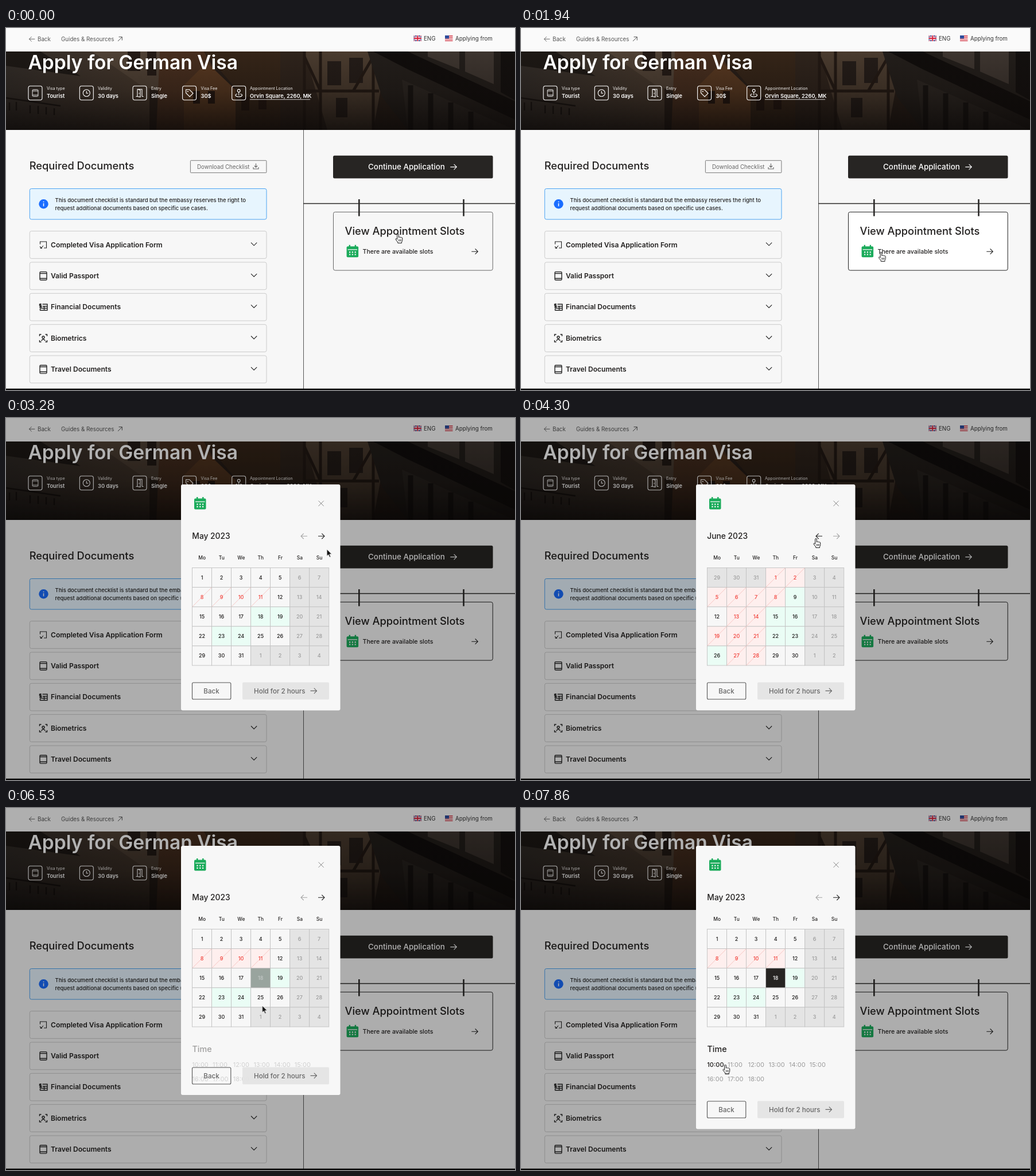
Animation, 887 px wide and 632 px high, one loop 8 s. Source, as an HTML page:

```html
<!DOCTYPE html>
<html lang="en">
<head>
<meta charset="utf-8">
<title>Visa appointment</title>
<style>
html, body { margin: 0; width: 100%; height: 100%; overflow: hidden; background: #f7f7f7; }
svg { display: block; width: 100%; height: 100%; }
text { font-family: Inter, "Open Sans", sans-serif; font-optical-sizing: none; fill: #232120; white-space: pre; }
.line { fill: none; stroke: #333; stroke-width: 1.1; }
.nav text { font-size: 9.75px; fill: #555; }
.facts text { font-size: 7.2px; fill: #f4f2f0; }
.facts .val { font-size: 9.3px; font-weight: 600; fill: #fff; }
.facts .line { stroke: #fff; stroke-width: 1.1; }
.rows text { font-size: 12.08px; font-weight: 600; }
.rows .line { stroke: #222; stroke-width: 1.4; }
.note { font-size: 9.42px; font-weight: 500; }
.h2 { font-size: 18.3px; font-weight: 500; }
.h3 { font-size: 13.8px; font-weight: 500; }
.mid { text-anchor: middle; }
.week { font-size: 8.5px; font-weight: 500; }
.day { font-size: 9px; font-weight: 500; }
.btn { font-size: 11.6px; font-weight: 500; fill: #666; }
.hours text { font-size: 11px; fill: #9a9a9a; }

.card, .dim, .modal, .shift, .panel, .foot, .may, .june, .busy, .mark, .pick, .time, .ten, .cursor, .hand, .arrow {
  animation-duration: 8s; animation-iteration-count: infinite; animation-timing-function: linear;
}
.dim, .modal { animation-name: open; animation-timing-function: step-end; }
.card { animation-name: card; }
.shift { animation-name: shift; animation-timing-function: step-end; }
.panel { animation-name: panel; }
.foot { animation-name: foot; }
.may { animation-name: may; animation-timing-function: step-end; }
.june { animation-name: june; animation-timing-function: step-end; }
.june .busy { animation: none; }
.busy { animation-name: busy; animation-timing-function: step-end; }
.mark { animation-name: mark; }
.pick { animation-name: pick; }
.time { animation-name: time; }
.ten { animation-name: ten; animation-timing-function: step-end; }
.cursor { animation-name: move; animation-timing-function: ease-in-out; }
.hand { animation-name: hand; animation-timing-function: step-end; }
.arrow { animation-name: arrow; animation-timing-function: step-end; }

@keyframes open { 0% { opacity: 0 } 25.9%, 100% { opacity: 1 } }
@keyframes card {
  0%, .93% { fill: #f7f7f7; stroke: #666 }
  5%, 25.8% { fill: #fff; stroke: #222 }
  25.9%, 100% { fill: #f7f7f7; stroke: #222 }
}
@keyframes shift { 0% { transform: translateY(0) } 79.6%, 100% { transform: translateY(-50px) } }
@keyframes panel { 0%, 80.56% { height: 394.5px } 82.41% { height: 435px } 84.26%, 100% { height: 494.5px } }
@keyframes foot {
  0%, 80.56% { transform: translateY(0) } 82.41% { transform: translateY(41px) } 84.26%, 100% { transform: translateY(100px) }
}
@keyframes may { 0% { opacity: 1 } 48.1% { opacity: 0 } 57.4%, 100% { opacity: 1 } }
@keyframes june { 0% { opacity: 0 } 48.1% { opacity: 1 } 57.4%, 100% { opacity: 0 } }
@keyframes busy { 0% { fill: #f7f7f7 } 48.1%, 100% { fill: #feefee } }
@keyframes mark {
  0%, 64.7% { opacity: 0 } 64.8%, 79.6% { opacity: 1 } 79.7%, 80.56% { opacity: 0 } 82.41% { opacity: .41 } 84.26%, 100% { opacity: 1 }
}
@keyframes pick {
  0%, 64.7% { fill: #232120 } 64.8%, 79.6% { fill: #fff } 79.7%, 80.56% { fill: #232120 } 82.41% { fill: #c3c8c6 } 84.26%, 100% { fill: #fff }
}
@keyframes time { 0%, 80.56% { opacity: 0 } 82.41% { opacity: .41 } 84.26%, 100% { opacity: 1 } }
@keyframes ten { 0% { fill: #9a9a9a; font-weight: 400 } 96.3%, 100% { fill: #1c1a19; font-weight: 500 } }
@keyframes move {
  0%, 1.5% { transform: translate(683px, 360px) }
  23.15%, 25.8% { transform: translate(627.5px, 392px) }
  25.9%, 30.56% { transform: translate(627px, 391px) }
  45.37%, 47.22% { transform: translate(549px, 205px) }
  54.63%, 56.48% { transform: translate(514px, 211px) }
  65.74%, 69.44% { transform: translate(446px, 357px) }
  73.15%, 79.5% { transform: translate(446px, 348.5px) }
  79.6%, 87.96% { transform: translate(446.5px, 345px) }
  97.22%, 100% { transform: translate(356px, 448.5px) }
}
@keyframes hand {
  0% { opacity: 1 } 25.9% { opacity: 0 } 42.6% { opacity: 1 } 57.4% { opacity: 0 }
  64.8% { opacity: 1 } 79.6% { opacity: 0 } 96.3%, 100% { opacity: 1 }
}
@keyframes arrow {
  0% { opacity: 0 } 25.9% { opacity: 1 } 42.6% { opacity: 0 } 57.4% { opacity: 1 }
  64.8% { opacity: 0 } 79.6% { opacity: 1 } 96.3%, 100% { opacity: 0 }
}
</style>
</head>
<body>
<svg viewBox="0 0 887 632" preserveAspectRatio="none">
<defs>
  <path id="to" d="M0 0H11M6.3-4.7 11 0 6.3 4.7" fill="none" stroke-width="1.1"/>
  <g id="cal">
    <rect y="2.5" width="20.5" height="19" rx="2" fill="#1bab5b"/>
    <path d="M5.2 0V5M15.3 0V5" stroke="#1bab5b" stroke-width="2.4"/>
    <path d="M2 8.2H18.5" stroke="#f7f7f7" stroke-width="1.3"/>
    <path d="M4.4 12.6h2.2m2.6 0h2.2m2.6 0h2.2M4.4 16.8h2.2m2.6 0h2.2m2.6 0h2.2" stroke="#f7f7f7" stroke-width="2.2"/>
  </g>
  <g id="pass" fill="none"><rect x="-6" y="-7.2" width="12" height="14.4" rx="1.6"/><path d="M-6-4.4H6M-6 4.4H6"/></g>
  <linearGradient id="shade" x2="0" y2="1">
    <stop offset="0" stop-color="#0e0a08" stop-opacity=".3"/>
    <stop offset=".5" stop-color="#0e0a08" stop-opacity=".5"/>
    <stop offset="1" stop-color="#0b0807" stop-opacity=".85"/>
  </linearGradient>
  <linearGradient id="wall"><stop stop-color="#3f3934"/><stop offset="1" stop-color="#5c4a3b"/></linearGradient>
  <clipPath id="hero"><rect y="41" width="887" height="137"/></clipPath>
</defs>

<rect width="887" height="632" fill="#f7f7f7"/>
<rect width="887" height="41" fill="#fafafa"/>

<g clip-path="url(#hero)">
  <rect y="41" width="887" height="137" fill="#33261e"/>
  <path d="M0 41H150L250 90V178H0z" fill="url(#wall)"/>
  <path d="M0 41H60L130 84 0 66z" fill="#231e1a"/>
  <path d="M150 41H270V112L235 100z" fill="#6a5848"/>
  <path d="M212 41h22v34h-22zM246 41h16v42h-16z" fill="#2c211b"/>
  <path d="M268 41H345L385 110V178H262z" fill="#5e3d28"/>
  <path d="M310 178V100L350 60 400 108V178z" fill="#754b2b"/>
  <path d="M345 41H490V178H400V105z" fill="#45301f"/>
  <path d="M326 110h12v22h-12zM352 110h12v22h-12zM410 120h14v24h-14zM440 118h14v24h-14z" fill="#2b1a12"/>
  <path d="M478 41H665L640 178H478z" fill="#63503f"/>
  <path d="M478 41H520L560 178H478z" fill="#3c2e24"/>
  <path d="M560 58h24v42h-24zM598 52h24v44h-24zM575 122h20v34h-20z" fill="#2d241f"/>
  <path d="M520 41V178M548 41V178M640 41V178M520 110H650M520 50 548 110M640 50 605 110" fill="none" stroke="#2b1f18" stroke-width="5"/>
  <path d="M630 41H887V178H700L655 120z" fill="#2b2622"/>
  <path d="M640 41H700L887 128V160L700 72z" fill="#110e0d"/>
  <path d="M735 41H790V72L735 50zM800 41H850V98L800 76z" fill="#514740"/>
  <path d="M690 90 887 178H700z" fill="#37312c"/>
  <path d="M705 100V178M740 114V178M775 130V178M810 146V178" stroke="#191614" stroke-width="9"/>
  <path d="M862 41H887V126L862 112z" fill="#151211"/>
  <path d="M0 122 95 136M6 130v14m12-15v15m24-9v14m14-13v14m14-12v13m14-11v12" stroke="#1d1815" stroke-width="2.4" fill="none"/>
  <rect y="41" width="887" height="137" fill="url(#shade)"/>
</g>

<g class="nav">
  <use href="#to" transform="translate(50.3 19.3) scale(-.9 .9)" stroke="#666"/>
  <text x="55" y="22.7">Back</text>
  <text x="96" y="22.7">Guides &amp; Resources</text>
  <path class="line" d="M195 23 202 16M196.5 15.6H202.3V21.5" style="stroke:#555;stroke-width:1"/>
  <g transform="translate(710.5 13)">
    <rect width="13.5" height="10" fill="#1f3c8c"/>
    <path d="M0 0 13.5 10M13.5 0 0 10" stroke="#fff" stroke-width="2"/>
    <path d="M0 0 13.5 10M13.5 0 0 10" stroke="#d8203a" stroke-width=".8"/>
    <path d="M6.75 0V10M0 5H13.5" stroke="#fff" stroke-width="3.6"/>
    <path d="M6.75 0V10M0 5H13.5" stroke="#d8203a" stroke-width="2"/>
  </g>
  <text x="728" y="22" style="fill:#333">ENG</text>
  <g transform="translate(765 13)">
    <rect width="13.5" height="10" fill="#fff"/>
    <path d="M0 .7H13.5M0 3.5H13.5M0 6.4H13.5M0 9.3H13.5" stroke="#d33a48" stroke-width="1.4"/>
    <rect width="7" height="5.4" fill="#2c4a9a"/>
  </g>
  <text x="783" y="22" style="fill:#333">Applying from</text>
</g>

<text x="38.5" y="72" style="font-size:33.5px;font-weight:600;fill:#fff">Apply for German Visa</text>
<g class="facts" id="facts"></g>

<text class="h2" x="40.7" y="246.7">Required Documents</text>
<rect class="line" x="321.4" y="231.3" width="132.5" height="21.4" rx="1" style="stroke:#777;stroke-width:1"/>
<text x="333" y="245.7" style="font-size:9.75px;fill:#666">Download Checklist</text>
<path class="line" d="M435.5 236.5V243M432.8 240.5 435.5 243.2 438.2 240.5M431 243V246H440V243" style="stroke:#666"/>

<rect x="41.3" y="280.5" width="412.7" height="53.6" rx="3" fill="#e7f5fe" stroke="#4ba3f2"/>
<circle cx="65.5" cy="307.3" r="8.2" fill="#1a6dff"/>
<path d="M65.5 306V311.3M65.5 302.8V304.3" stroke="#fff" stroke-width="1.5"/>
<text class="note" x="85.5" y="303.7">This document checklist is standard but the embassy reserves the right to</text>
<text class="note" x="85.5" y="318.4">request additional documents based on specific use cases.</text>
<g class="rows" id="rows"></g>

<path d="M518.5 178V630" stroke="#555"/>
<path d="M518 306.5H887" stroke="#2a2827" stroke-width="1.7"/>
<rect x="570" y="222.7" width="278.5" height="39.8" rx="2.5" fill="#272523"/>
<text x="631" y="247.3" style="font-size:13.4px;font-weight:500;fill:#fff">Continue Application</text>
<use href="#to" x="774.3" y="242.6" stroke="#fff"/>

<rect class="card" x="570.5" y="321.3" width="277.7" height="101.8" rx="3"/>
<path d="M615.3 299V328.5M797.5 299V328.5" stroke="#2a2827" stroke-width="2.6"/>
<text class="h2" x="590.5" y="360.7">View Appointment Slots</text>
<use href="#cal" x="593.6" y="378.7"/>
<text x="621.5" y="394" style="font-size:10.6px;font-weight:500">There are available slots</text>
<use href="#to" x="811.3" y="390.2" stroke="#222"/>
<rect y="629.6" width="887" height="3" fill="#000"/>

<rect class="dim" width="887" height="632" fill="rgba(0,0,0,.3)"/>
<g class="modal"><g class="shift">
  <rect class="panel" x="305" y="116" width="277.5" height="394.5" rx="3" fill="#f7f7f7"/>
  <use href="#cal" x="328" y="138"/>
  <path d="M544.5 144.6 553.7 153.8M553.7 144.6 544.5 153.8" stroke="#888"/>
  <g id="week"></g>
  <g class="may" id="may"></g>
  <g class="june" id="june"></g>
  <g class="time hours" id="hours"><text x="324.5" y="476.3" style="font-size:14.3px;font-weight:500;fill:#232120">Time</text></g>
  <g class="foot">
    <rect x="412" y="461.5" width="151" height="30" rx="2" fill="#e4e4e4" fill-opacity=".94"/>
    <rect class="line" x="324.5" y="462" width="67.3" height="29" rx="2" style="stroke:#555"/>
    <text class="btn mid" x="358" y="480.7">Back</text>
    <text class="btn" x="432" y="480.7">Hold for 2 hours</text>
    <use href="#to" x="530.5" y="476.4" stroke="#666"/>
  </g>
</g></g>

<g class="cursor">
  <g class="hand" fill="#fff" stroke="#111" stroke-linejoin="round">
    <path d="M-1.3 8.5V.8a1.3 1.3 0 0 1 2.6 0V5.5a1.2 1 0 0 1 2.3.2 1.2 1 0 0 1 2.2.4 1.1 1 0 0 1 1.9.8V10.5q0 2-1.2 3.2V15.4H-.2V14L-3.9 9.4q-.6-1.2.4-1.6 .8-.3 2.2 1.4z"/>
    <path d="M1.4 9V12.5M3.4 9V12.5M5.3 9V12.5" stroke-width=".8"/>
  </g>
  <path class="arrow" d="M0 0V12.2L2.8 9.6 4.8 14.2 6.8 13.3 4.8 8.8H8.6z" fill="#111" stroke="#fff" stroke-width=".8"/>
</g>
</svg>

<script>
const LOOP = 8000, STEPS = 54;
const put = (id, html) => document.getElementById(id).insertAdjacentHTML('beforeend', html);

const door = '<path d="M-4 6V-6.5H4V6M-6.5 6H-4M4 6H6.5M-4-6.5 1-5V7L-4 6M-1 0V1.5"/>';
const facts = [
  [39, 71, 'Visa type', 'Tourist', '<use href="#pass" transform="scale(.82)"/>'],
  [128.3, 160, 'Validity', '30 days', '<circle r="6"/><path d="M0-3.5V.5H3"/>'],
  [221, 253, 'Entry', 'Single', door],
  [307.6, 339.5, 'Visa Fee', '30$', '<path d="M-6-6H0L6.5 .5 .5 6.5-6 0z"/><circle cx="-2.8" cy="-2.8" r=".5"/>'],
  [393.7, 425, 'Appointment Location', 'Orvin Square, 2260, MK',
    '<circle cy="-4" r="2.4"/><path d="M0-1.6V4M-2.5 1.5C-9 3-5 6.5 0 6.5S9 3 2.5 1.5"/>']
];
put('facts', facts.map(([bx, x, label, val, icon]) => `
  <rect class="line" x="${bx}" y="101.3" width="24" height="24.4" rx="3.5"/>
  <g class="line" transform="translate(${bx + 12} 113.5)">${icon}</g>
  <text x="${x}" y="108.4">${label}</text><text class="val" x="${x}" y="122">${val}</text>`).join('')
  + '<path d="M425 124.8H530" stroke="#fff" stroke-width=".8"/>');

const book = '<use href="#pass"/>';
const rows = [
  ['Completed Visa Application Form', '<path stroke-width="1.1" d="M-5.5-1V-5.5H5.5V5.5H1M-6 3 -3.5 5.5 0 1.5M-5.5 6H-2"/>'],
  ['Valid Passport', book],
  ['Financial Documents', '<path d="M-1.5-5H7V5.5H-5.5V2M-1.5-1.5H7M-5.5 2H7M1.5-1.5V5.5M-3-5H-6.5V-2.6H-3.5V0H-7M-5-6.2V1"/>'],
  ['Biometrics', '<path d="M-6.5-3.5V-6.5H-3.5M3.5-6.5H6.5V-3.5M6.5 3.5V6.5H3.5M-3.5 6.5H-6.5V3.5M-3.5 4.5Q0-.5 3.5 4.5"/><circle cy="-1.5" r="2"/>'],
  ['Travel Documents', book]
];
put('rows', rows.map(([name, icon], i) => `<g transform="translate(0 ${i * 54.35})">
  <rect x="41.3" y="354.6" width="412.7" height="47.8" rx="3" fill="none" stroke="#cbcbcb"/>
  <g class="line" transform="translate(65 378.5)">${icon}</g>
  <text x="78" y="382.8">${name}</text>
  <path class="line" d="M427 374.7 432.1 379.8 437.2 374.7" style="stroke-width:1.1"/></g>`).join(''));

const W = 34.03, H = 34.1, X = 324.5, Y = 261.5;
put('week', ['Mo', 'Tu', 'We', 'Th', 'Fr', 'Sa', 'Su'].map((d, c) =>
  `<text class="week mid" x="${X + W * (c + .5) + .3}" y="247.3">${d}</text>`).join(''));

function month(id, title, lead, len, busy, free, back) {
  let boxes = '', marks = '';
  for (let i = 0; i < 35; i++) {
    const x = X + i % 7 * W, y = Y + Math.floor(i / 7) * H, d = i + 1 - lead;
    const out = d < 1 || d > len, off = out || i % 7 > 4;
    const full = !off && busy.includes(d), pick = id === 'may' && d === 18;
    const fill = off ? '#e4e4e4' : full ? '#feefee' : free.includes(d) ? '#eafdf5' : '#f7f7f7';
    const ink = off ? '#9b9b9b' : full ? '#f2413a' : '#1c1a19';
    const rect = (cls, color) =>
      `<rect class="${cls}" x="${x}" y="${y}" width="${W}" height="${H}" fill="${color}" stroke="#c2c2c2" stroke-width=".9"/>`;
    boxes += rect(full ? 'busy' : '', fill);
    if (full) marks += `<path d="M${x} ${y + H}L${x + W} ${y}" stroke="#f5bdb9" stroke-width=".8"/>`;
    if (pick) marks += rect('mark', '#262422');
    marks += `<text class="day mid${pick ? ' pick' : ''}" x="${x + W / 2}" y="${y + 20.2}"${pick ? '' : ` style="fill:${ink}"`}>${d < 1 ? 31 + d : out ? d - len : d}</text>`;
  }
  const tone = on => on ? '#222' : '#a3a3a3';
  put(id, `<text class="h3" x="324.3" y="211.4">${title}</text>
    <use href="#to" transform="translate(525 206.3) scale(-1 1)" stroke="${tone(back)}"/>
    <use href="#to" x="544" y="206.3" stroke="${tone(!back)}"/>` + boxes + marks);
}
month('may', 'May 2023', 0, 31, [8, 9, 10, 11], [18, 19, 23, 24], false);
month('june', 'June 2023', 3, 30, [1, 2, 5, 6, 7, 8, 13, 14, 19, 20, 21, 27, 28], [9, 15, 16, 22, 23, 26], true);

for (let i = 0; i < 9; i++)
  put('hours', `<text class="${i ? '' : 'ten'}" x="${324.3 + i % 6 * 35.7}" y="${i < 6 ? 502 : 526.8}">${10 + i}:00</text>`);

// The keyframes run on a clock that ticks 54 times per loop.
const anims = document.getAnimations();
anims.forEach(a => a.pause());
const start = performance.now();
function tick() {
  const t = (performance.now() - start) % LOOP;
  const time = (Math.floor(t / LOOP * STEPS) + .5) * LOOP / STEPS;
  anims.forEach(a => { a.currentTime = time; });
  requestAnimationFrame(tick);
}
tick();
</script>
</body>
</html>
```
